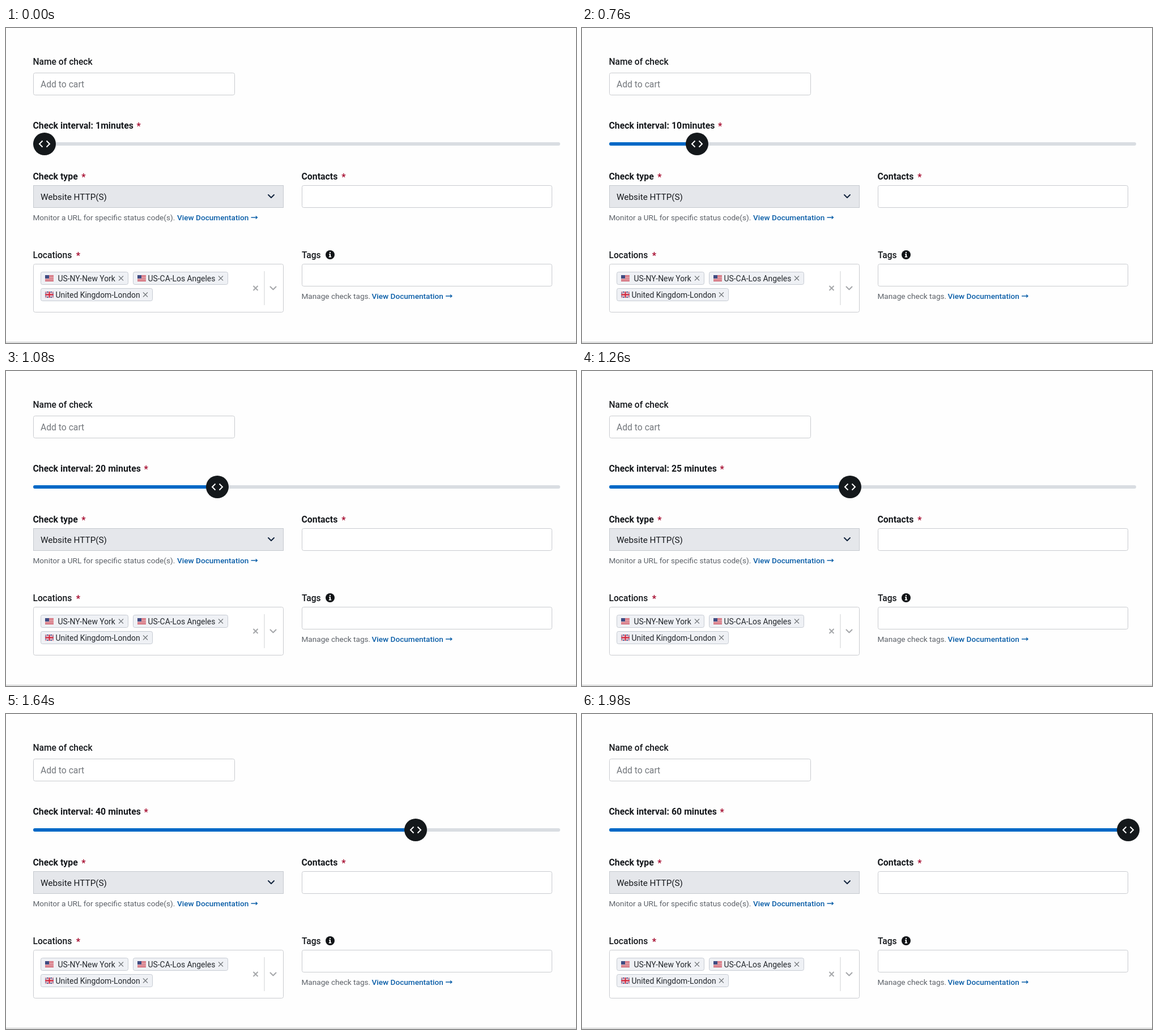
Write an HTML page that moves like this. It is 1006 px wide and 557 px high and loops after 2.16 s.

```html
<!DOCTYPE html>
<html lang="en">
<head>
<meta charset="utf-8">
<title>Check settings</title>
<style>
  html, body { margin: 0; width: 100%; height: 100%; overflow: hidden; background: #fefefe; }
  svg { display: block; width: 1006px; height: 557px; }
  text { font-family: Roboto, "Open Sans", sans-serif; font-size: 15.7px; fill: #16191d; }
  .label { font-size: 15.6px; font-weight: 500; }
  .bold { font-size: 15.85px; font-weight: 700; }
  .hint { font-size: 13.6px; fill: #5c6168; }
  .link { font-size: 13.6px; font-weight: 500; fill: #0a5ea8; }
  .chip { font-size: 13.9px; fill: #24282d; }
  .star { font-size: 16px; font-weight: 700; fill: #a50a2d; text-anchor: middle; }
  .field { fill: #fff; stroke: #c9cbcf; }
  .line { fill: none; stroke-width: 2; stroke-linecap: round; stroke-linejoin: round; }
</style>
</head>
<body>
<svg id="stage" viewBox="0 0 1006 557">
  <defs>
    <g id="us">
      <rect width="15" height="11" fill="#f4e9ea"/>
      <path d="M0 .8H15M0 3.2H15M0 5.6H15M0 8H15M0 10.3H15" stroke="#c73a4b" stroke-width="1.25"/>
      <rect width="7" height="6" fill="#3f4c82"/>
    </g>
    <g id="uk">
      <rect width="15" height="11" fill="#263a7c"/>
      <path d="M0 0 15 11M15 0 0 11" stroke="#fff" stroke-width="2.2"/>
      <path d="M0 0 15 11M15 0 0 11" stroke="#cf2940" stroke-width=".9"/>
      <path d="M7.5 0V11M0 5.5H15" stroke="#fff" stroke-width="4"/>
      <path d="M7.5 0V11M0 5.5H15" stroke="#cf2940" stroke-width="2.3"/>
    </g>
    <path id="arrow" d="M0 0H11M8.2-2.6 11 0 8.2 2.6" fill="none" stroke="#0a5ea8" stroke-width="1.3"/>
    <path id="chevron" d="M-5-2.5 0 2.5 5-2.5" class="line"/>
  </defs>

  <text class="label" x="47.5" y="65">Name of check</text>
  <rect class="field" x="48.5" y="79.5" width="355" height="39" rx="3"/>
  <text x="61" y="105" style="fill:#74787d">Add to cart</text>

  <text class="bold" x="47.5" y="178">Check interval:</text>
  <text class="bold" id="value" x="158" y="178"></text>
  <text class="bold" id="unit" y="178" text-anchor="end">minutes</text>
  <text class="star" id="unitStar" y="179">*</text>

  <rect x="48" y="202" width="930" height="6" rx="3" fill="#d9dde2"/>
  <rect id="fill" x="48" y="202" height="6" rx="3" fill="#0068c6"/>
  <g id="knob">
    <circle r="20" fill="#14181b"/>
    <path d="M-3.5-5.5-9 0-3.5 5.5M3.5-5.5 9 0 3.5 5.5" fill="none" stroke="#fff" stroke-width="2"/>
  </g>

  <text class="bold" x="47.5" y="268">Check type</text>
  <text class="star" x="137" y="269">*</text>
  <rect x="48.5" y="278.5" width="441" height="39" fill="#e5e7eb" stroke="#c5c9cf"/>
  <text x="61" y="304" style="font-size:15.3px">Website HTTP(S)</text>
  <use href="#chevron" x="468" y="297.5" stroke="#14263f"/>
  <text class="hint" x="47.5" y="340">Monitor a URL for specific status code(s).</text>
  <text class="link" x="302" y="340">View Documentation</text>
  <use href="#arrow" x="432.5" y="335"/>

  <text class="bold" x="521.5" y="268">Contacts</text>
  <text class="star" x="596" y="269">*</text>
  <rect class="field" x="522.5" y="278.5" width="441" height="39" rx="3"/>

  <text class="label" x="47.5" y="407">Locations</text>
  <text class="star" x="127.5" y="408">*</text>
  <rect class="field" x="48.5" y="417.5" width="441" height="85" rx="3"/>
  <g id="chips"></g>
  <path d="M436.5 456l8 8m0-8l-8 8" class="line" stroke="#a5a7aa" style="stroke-linecap:butt"/>
  <path d="M456 430V490" stroke="#cfd1d4"/>
  <use href="#chevron" x="471.5" y="460" stroke="#a5a7aa"/>

  <text class="label" x="522" y="407">Tags</text>
  <circle cx="572" cy="401" r="8" fill="#111417"/>
  <path d="M571 396h2v2h-2zM570 399.2h3v4.6h1.2v1.6h-4.4v-1.6h1.2v-3h-1z" fill="#fff"/>
  <rect class="field" x="522.5" y="417.5" width="441" height="39" rx="3"/>
  <text class="hint" x="521.5" y="479">Manage check tags.</text>
  <text class="link" x="645.5" y="479">View Documentation</text>
  <use href="#arrow" x="776" y="474"/>

  <path d="M0 555.5H1006" stroke="#b9babb"/>
</svg>
<script>
  const LOOP = 2160;
  // start time (ms), minutes, knob centre
  const STEPS = [
    [0, 1, 68], [400, 3, 97], [580, 5, 123], [760, 10, 203], [900, 15, 283], [1080, 20, 373],
    [1260, 25, 473], [1460, 35, 583], [1640, 40, 723], [1800, 50, 853], [1980, 60, 964]
  ];
  const CHIPS = [
    { x: 61, y: 431, width: 155, flag: "us", textX: 92, name: "US-NY-New York" },
    { x: 224, y: 431, width: 168, flag: "us", textX: 251, name: "US-CA-Los Angeles" },
    { x: 61, y: 460, width: 198, flag: "uk", textX: 88, name: "United Kingdom-London" }
  ];
  const el = id => document.getElementById(id);

  el("chips").innerHTML = CHIPS.map(c => `
    <rect x="${c.x + .5}" y="${c.y + .5}" width="${c.width - 1}" height="22" rx="3" fill="#eff1f5" stroke="#c6cbd3"/>
    <use href="#${c.flag}" x="${c.x + 8}" y="${c.y + 6}"/>
    <text class="chip" x="${c.textX - .5}" y="${c.y + 17}">${c.name}</text>
    <path d="M${c.x + c.width - 17} ${c.y + 7.5}l8 8m0-8l-8 8" stroke="#707479" stroke-width="1.1"/>`).join("");

  // The digit 1 is narrower than the others, so the unit moves with the value.
  const digitsWidth = value => [...String(value)].reduce((sum, d) => sum + (d === "1" ? 6 : 9.5), 0);

  function render(time) {
    const [, minutes, x] = STEPS.findLast(step => step[0] <= time);
    const end = 218.9 + digitsWidth(minutes);
    el("value").textContent = minutes;
    el("unit").setAttribute("x", end);
    el("unitStar").setAttribute("x", end + 9.3);
    el("fill").setAttribute("width", x - 48);
    el("knob").setAttribute("transform", `translate(${x} 205)`);
  }

  const start = performance.now();
  function tick() {
    render((performance.now() - start) % LOOP);
    requestAnimationFrame(tick);
  }
  tick();
</script>
</body>
</html>
```
